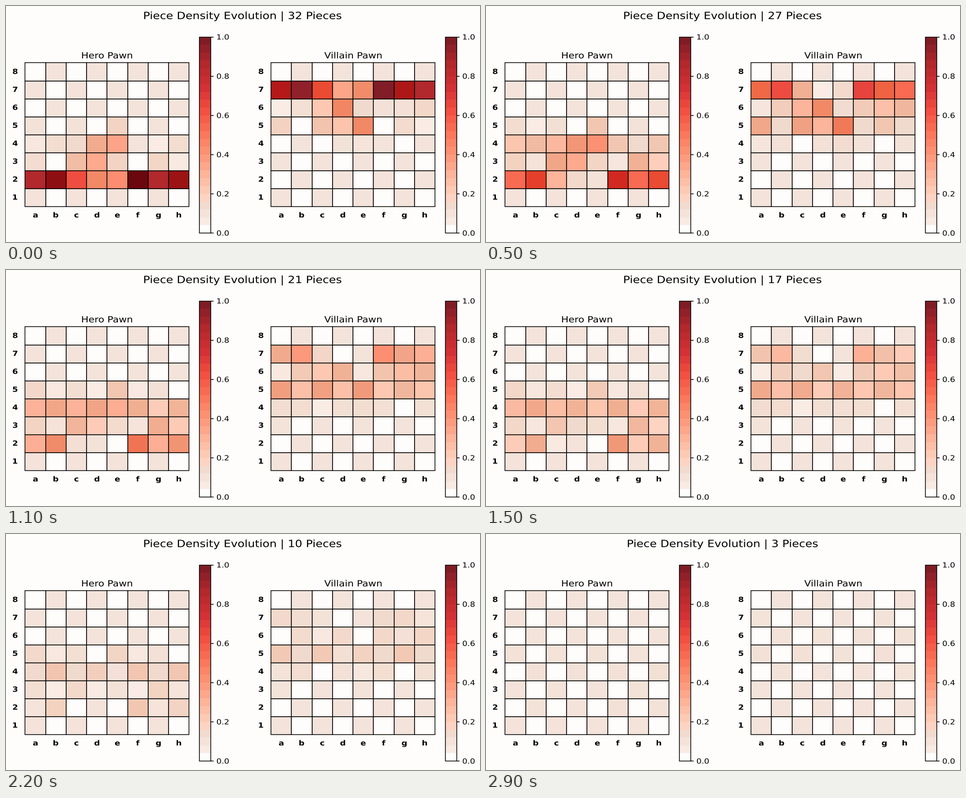
These frames come from a looping animation (1000x500 px, 3000 ms). A matplotlib script:

```python
import matplotlib.pyplot as plt
import numpy as np
from matplotlib.animation import FuncAnimation
from matplotlib.patches import PathPatch, Rectangle
from matplotlib.textpath import TextPath
from matplotlib.transforms import Affine2D

WIDTH, HEIGHT, DPI = 1000, 500, 100
FRAMES, INTERVAL = 30, 100
PIECES = 32
PIXEL_ASPECT = 1.138  # the whole stage uses wide pixels
PT = 1.507            # one point in stage pixels, vertically
LINE = 1.1

PAPER = np.array([254, 253, 252]) / 255
BLUSH = np.array([250, 236, 229]) / 255
TAN = np.array([240, 217, 205]) / 255
SADDLE_BROWN = np.array([139, 69, 19]) / 255
ALPHA = 0.9

TOP, CELL_W, CELL_H = 120.45, 43.25, 38.05
BAR_TOP, BAR_H, BAR_W, BAR_GAP = 65.5, 415.5, 23.5, 368
BANDS = 25
FILES = "abcdefgh"


def reds_over(background, value):
    reds = np.array(plt.cm.Reds(float(value))[:3])
    return ALPHA * reds + (1 - ALPHA) * background


def light_color(value):
    """Tint of a light square or colour bar band."""
    if value < 0.035:
        return PAPER
    if value < 0.18:
        return BLUSH + (TAN - BLUSH) * np.clip((value - 0.05) / 0.1, 0, 1)
    return reds_over(np.ones(3), value)


def dark_color(value):
    return reds_over(SADDLE_BROWN, value)


def pawn_density(frame, unmoved, depth):
    """Density on the home rank and the four ranks ahead, by file.

    unmoved: share of pawns still at home at the start
    depth: mean number of ranks that a moved pawn has advanced
    """
    progress = frame / FRAMES
    # files opened early also empty faster and lose their pawns sooner
    home = unmoved * np.exp(-frame / (14 * unmoved ** 1.6))
    alive = 1 - progress ** (unmoved + 0.4)
    steps = np.arange(1, 5)[:, None]
    spread = np.exp(-((steps - depth - 0.6 * progress) / 0.65) ** 2 / 2)
    ahead = (1 - home) * alive * spread / spread.sum(axis=0)
    return np.vstack([home * (1 - progress ** 5), ahead])


def text_path(text, x, baseline, points, anchor="center", weight="normal"):
    path = TextPath((0, 0), text, size=points * PT,
                    prop={"family": "DejaVu Sans", "weight": weight})
    box = path.get_extents()
    origin = {"center": (box.x0 + box.x1) / 2, "left": 0}[anchor]
    place = Affine2D().translate(-origin, 0).scale(PIXEL_ASPECT, -1)
    return place.translate(x, baseline).transform_path(path)


fig = plt.figure(figsize=(WIDTH / DPI, HEIGHT / DPI), dpi=DPI, facecolor=PAPER)
ax = fig.add_axes([0, 0, 1, 1])
ax.set(xlim=(0, WIDTH), ylim=(HEIGHT, 0))
ax.axis("off")


def add_text(*args, **kwargs):
    patch = PathPatch(text_path(*args, **kwargs), fc="black", lw=0, zorder=4)
    return ax.add_patch(patch)


def add_colorbar(x):
    band_h = BAR_H / BANDS
    for i in range(BANDS):
        y = BAR_TOP + BAR_H - (i + 1) * band_h
        ax.add_patch(Rectangle((x, y), BAR_W, band_h, lw=0,
                               fc=light_color((i + 0.5) / BANDS)))
    ax.add_patch(Rectangle((x, BAR_TOP), BAR_W, BAR_H, fill=False,
                           ec="black", lw=LINE, zorder=3))
    right = x + BAR_W
    for value in np.linspace(0, 1, 6):
        y = BAR_TOP + BAR_H * (1 - value)
        ax.plot([right, right + 6], [y, y], color="black", lw=LINE,
                solid_capstyle="butt")
        add_text(f"{value:.1f}", right + 12, y + 5.5, 10, anchor="left")


class Board:
    def __init__(self, left, title, home, step, unmoved, depth):
        self.ranks = [home + step * i for i in range(5)]
        self.unmoved, self.depth = np.array(unmoved), np.array(depth)
        self.cells = {}
        add_text(title, left + 4 * CELL_W, 111, 12)
        for rank in range(1, 9):
            y = TOP + (8 - rank) * CELL_H
            add_text(str(rank), left - 21, y + CELL_H / 2 + 4.5, 10,
                     weight="bold")
            for col in range(8):
                self.cells[rank, col] = ax.add_patch(Rectangle(
                    (left + col * CELL_W, y), CELL_W, CELL_H,
                    ec="black", lw=LINE, zorder=2))
        for col, name in enumerate(FILES):
            add_text(name, left + (col + 0.5) * CELL_W, 448, 10, weight="bold")
        add_colorbar(left + BAR_GAP)

    def show(self, frame):
        density = pawn_density(frame, self.unmoved, self.depth)
        values = dict(zip(self.ranks, density))
        for (rank, col), cell in self.cells.items():
            value = values[rank][col] if rank in values else 0
            is_dark = (rank + col) % 2 == 1
            cell.set_facecolor((dark_color if is_dark else light_color)(value))


boards = [
    Board(40.3, "Hero Pawn", home=2, step=1,
          unmoved=[0.86, 0.92, 0.63, 0.38, 0.43, 1.0, 0.86, 0.89],
          depth=[1.7, 1.7, 1.4, 1.4, 2.0, 1.7, 1.2, 1.3]),
    Board(559, "Villain Pawn", home=7, step=-1,
          unmoved=[0.81, 0.94, 0.58, 0.35, 0.37, 0.97, 0.83, 0.86],
          depth=[1.9, 1.5, 1.4, 1.3, 1.9, 1.4, 1.2, 1.3]),
]


def heading_path(frame):
    text = f"Piece Density Evolution | {PIECES - frame} Pieces"
    return text_path(text, 499.5, 27.7, 14)


heading = ax.add_patch(PathPatch(heading_path(0), fc="black", lw=0))


def update(frame):
    heading.set_path(heading_path(frame))
    for board in boards:
        board.show(frame)
    return [heading]


anim = FuncAnimation(fig, update, frames=FRAMES, interval=INTERVAL,
                     repeat=True, repeat_delay=0, blit=False)
plt.show()
```
